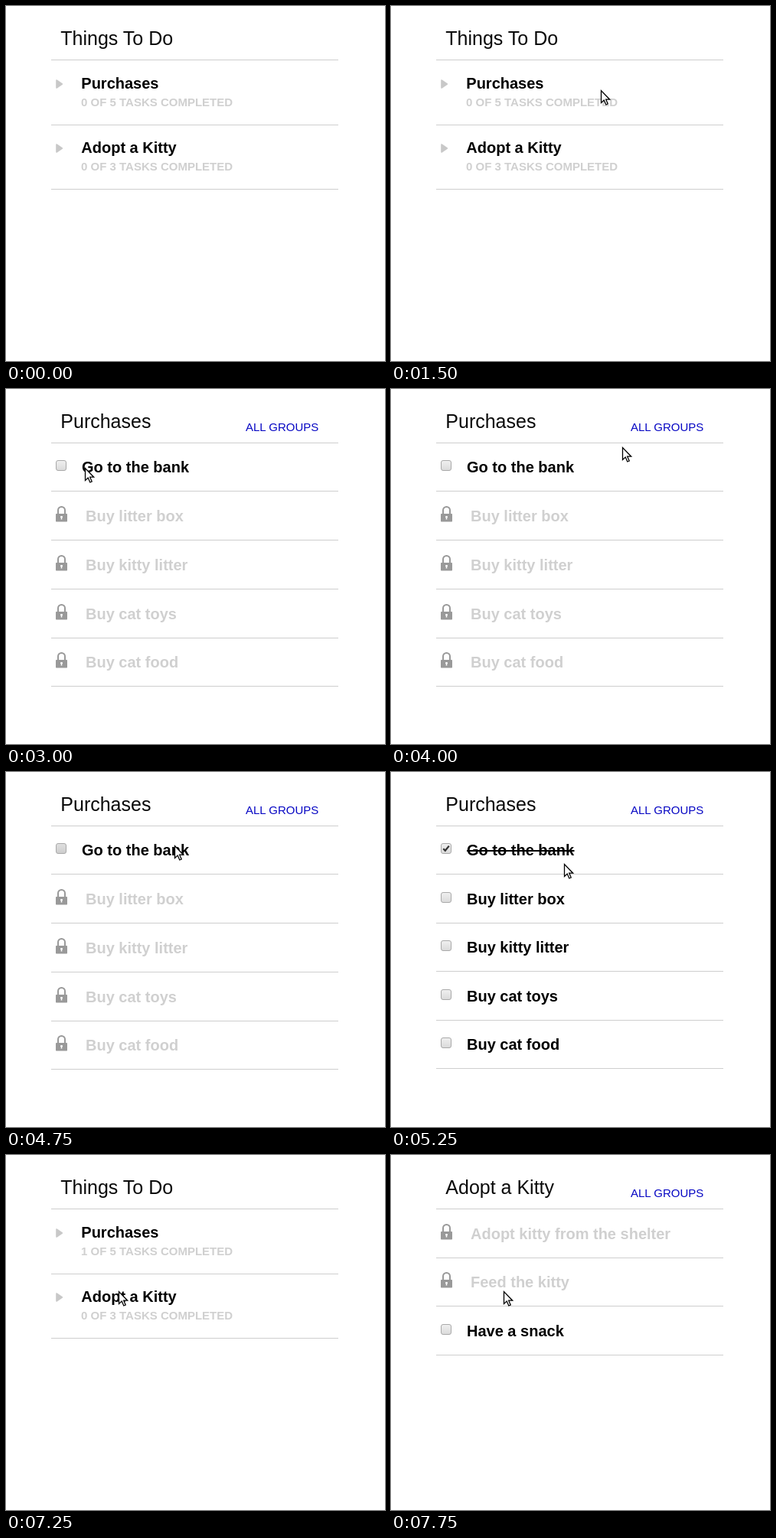
An HTML page for the animation above (8 s loop, 495x464 px).

```html
<!DOCTYPE html>
<html lang="en">
<head>
<meta charset="utf-8">
<title>Things To Do</title>
<style>
  html, body { margin: 0; width: 100%; height: 100%; overflow: hidden; background: #fff; }
  svg { display: block; font-family: "Liberation Sans", Arial, sans-serif; }
  .title { font-size: 25px; fill: #0a0a0a; }
  .item { font-size: 20px; font-weight: bold; }
  .locked { fill: #d0d0d0; }
  .count { font-size: 15px; font-weight: bold; fill: #d0d0d0; }
  .link { font-size: 15px; fill: #0808c4; }
  .rule { fill: #cecece; }
</style>
</head>
<body>
<svg width="495" height="464" viewBox="0 0 495 464">
  <defs>
    <linearGradient id="idle" x2="0" y2="1">
      <stop stop-color="#f0f0f0"/><stop offset="1" stop-color="#dadada"/>
    </linearGradient>
    <linearGradient id="pressed" x2="0" y2="1">
      <stop stop-color="#e0e0e0"/><stop offset="1" stop-color="#cccccc"/>
    </linearGradient>
  </defs>
  <g id="page"></g>
  <path id="cursor" d="M.5 .5V16.5L4.2 13 6.8 19 9.2 18 6.7 12.2H11.7Z" fill="#fff" stroke="#000" stroke-width="1.3"/>
</svg>
<script>
const LOOP = 8000, STEP = 250;
const page = document.getElementById("page");
const cursor = document.getElementById("cursor");

const text = (cls, x, y, str) => `<text class="${cls}" x="${x}" y="${y}">${str}</text>`;
const rule = y => `<rect class="rule" x="59" y="${y}" width="375" height="1"/>`;
const header = title => text("title", 71.3, 51, title) + rule(70);

const lock = y => `<g transform="translate(65 ${y})">
  <path d="M3 11V5.5a4.5 4.5 0 0 1 9 0V11" fill="none" stroke="#999" stroke-width="2"/>
  <rect y="10" width="15" height="10.5" rx=".8" fill="#999"/>
  <path d="M7.5 13v4.5M6 14.2h3" stroke="#fff" stroke-width="1.6"/></g>`;

const checkbox = (y, checked, fill) => `<g transform="translate(65 ${y})">
  <rect x=".5" y=".5" width="13" height="13" rx="2.5" fill="url(#${fill})" stroke="#a9a9a9"/>
  ${checked ? '<path d="M3.3 7.2L5.8 9.8 10.8 3.6" fill="none" stroke="#333" stroke-width="2.2"/>' : ""}</g>`;

const group = (y, name, done, total) =>
  `<path d="M66 ${y - 11}v10l7.3 -5z" fill="#c8c8c8" stroke="#c8c8c8" stroke-width="1.6" stroke-linejoin="round"/>`
  + text("item", 98.3, y, name)
  + text("count", 98, y + 23, `${done} OF ${total} TASKS COMPLETED`)
  + rule(y + 47);

const groups = done => header("Things To Do")
  + group(108, "Purchases", done, 5) + group(192, "Adopt a Kitty", 0, 3);

// Locked rows are slightly taller than open ones.
function taskList(title, tasks, fill = "idle") {
  let bottom = 69.9;
  return header(title) + text("link", 313, 55, "ALL GROUPS") + tasks.map(([name, state]) => {
    const locked = state === "locked", done = state === "done";
    bottom += locked ? 63.75 : 63.45;
    const y = Math.round(bottom);
    return (locked ? lock(y - 44) : checkbox(y - 40, done, fill))
      + text(locked ? "item locked" : "item", locked ? 104 : 99, y - 24, name)
      + (done ? `<rect x="99" y="${y - 31}" width="140.5" height="2"/>` : "")
      + rule(y);
  }).join("");
}

const supplies = ["litter box", "kitty litter", "cat toys", "cat food"];
const purchases = (bank, rest, fill) => taskList("Purchases",
  [["Go to the bank", bank], ...supplies.map(s => ["Buy " + s, rest])], fill);

const kitty = taskList("Adopt a Kitty", [
  ["Adopt kitty from the shelter", "locked"],
  ["Feed the kitty", "locked"],
  ["Have a snack", "open"]
]);

const pages = [
  { at: 0, markup: groups(0) },
  { at: 3000, markup: purchases("open", "locked") },
  { at: 4500, markup: purchases("open", "locked", "pressed") },
  { at: 5000, markup: purchases("done", "open") },
  { at: 6000, markup: groups(1) },
  { at: 7500, markup: kitty }
];

// The pointer enters at the right, then glides to each goal and rests until the next move.
const entry = { at: 1000, x: 450, y: 121 };
const moves = [
  { from: 1000, to: 2000, x: 97, y: 98 },
  { from: 2000, to: 2500, x: 90, y: 103 },
  { from: 2750, to: 3000, x: 103, y: 103 },
  { from: 3250, to: 4000, x: 302, y: 76 },
  { from: 4000, to: 4750, x: 220, y: 96 },
  { from: 4750, to: 5250, x: 226, y: 120 },
  { from: 5250, to: 6250, x: 350, y: 47 },
  { from: 6250, to: 7250, x: 147, y: 178 }
];

const smooth = p => p * p * (3 - 2 * p);

function pointerAt(t) {
  let { x, y } = entry;
  for (const move of moves) {
    const p = smooth(Math.min(1, Math.max(0, (t - move.from) / (move.to - move.from))));
    x += (move.x - x) * p;
    y += (move.y - y) * p;
  }
  return [Math.round(x), Math.round(y)];
}

let shown;

function draw(now) {
  const t = Math.floor(now % LOOP / STEP) * STEP;
  const current = pages.findLast(p => p.at <= t);
  if (current !== shown) {
    shown = current;
    page.innerHTML = current.markup;
  }
  cursor.setAttribute("visibility", t < entry.at ? "hidden" : "visible");
  cursor.setAttribute("transform", `translate(${pointerAt(t)})`);
}

let start;
function tick(now) {
  start ??= now;
  draw(now - start);
  requestAnimationFrame(tick);
}
draw(0);
requestAnimationFrame(tick);
</script>
</body>
</html>
```
